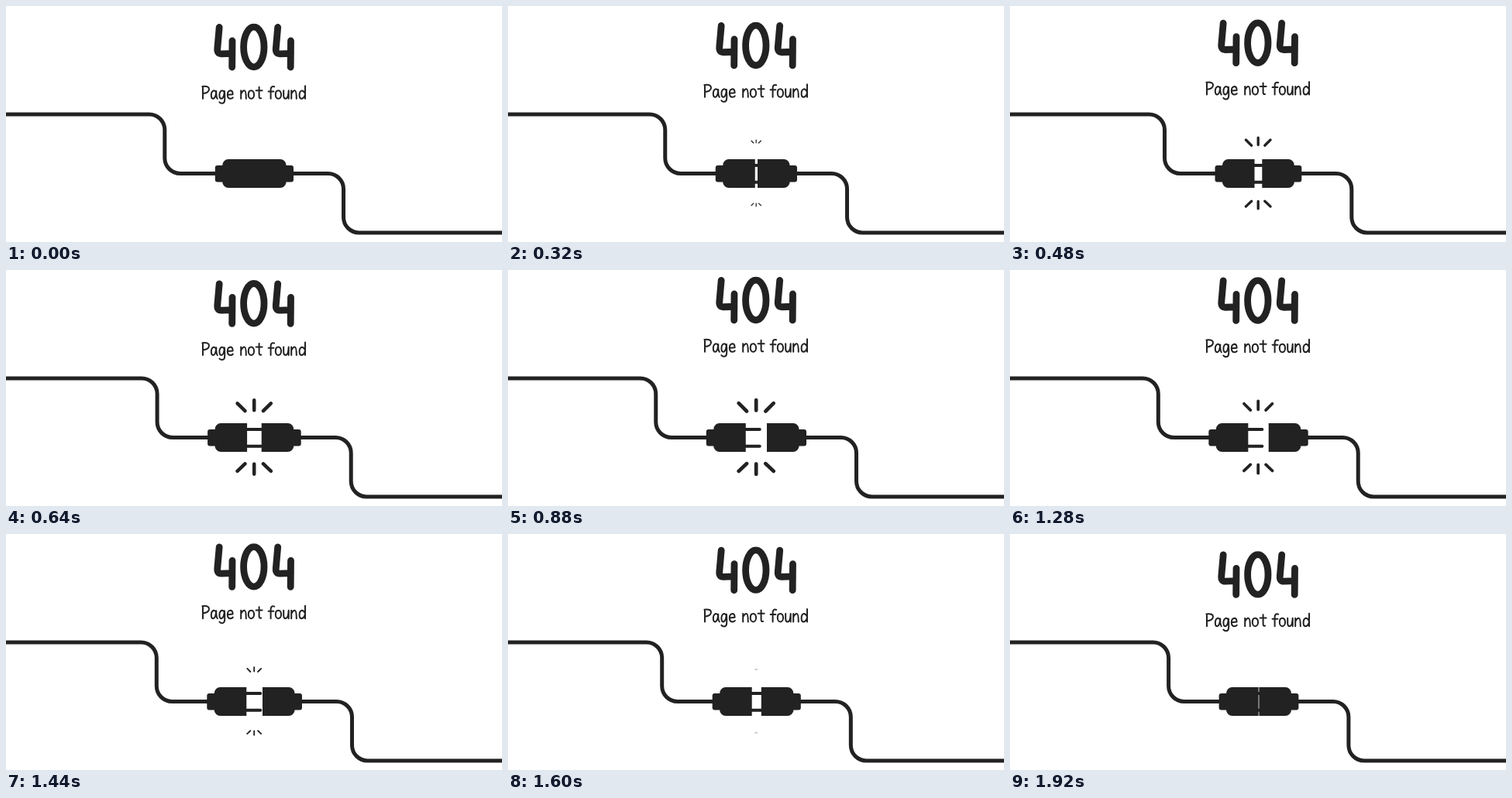
These frames come from a looping animation (640x305 px, 2 s). An HTML page:

```html
<!DOCTYPE html>
<html lang="en">
<head>
<meta charset="utf-8">
<title>404 Page not found</title>
<style>
  html, body { margin: 0; width: 100%; height: 100%; overflow: hidden; background: #fff; }
  svg { display: block; width: 100%; height: 100%; }
  .line { fill: none; stroke: #222; stroke-linecap: round; stroke-linejoin: round; }
  .cable { stroke-width: 5; stroke-linecap: butt; }
  .prong { stroke-width: 4; }
  .ray { stroke-width: 4.7; }
  .digit { stroke-width: 8.8; }
  .letter { stroke-width: 2; }
  .solid { fill: #222; }
  /* selectable text beneath the drawn handwriting */
  text { fill: transparent; font-family: "Open Sans", sans-serif; text-anchor: middle; }
</style>
</head>
<body>
<svg viewBox="0 0 640 305">
  <defs>
    <path id="four" class="line digit" d="M275.2 27.5 L272.8 55 Q272.2 62 278 61.8 L292 61.3 M292 45 L291.7 79"/>
    <path id="plug" class="solid" d="M320 198 V235 H286 Q283 235 281 233 L279.5 231 Q278.5 229.5 278.5 227.5 H272 Q269 227.5 269 224.5 V209 Q269 206 272 206 H278.5 Q278.5 203.5 279.5 202 L281 200 Q283 198 286 198 Z"/>
  </defs>

  <g id="title">
    <text x="320" y="80" font-size="76">404</text>
    <text x="320" y="120" font-size="20">Page not found</text>
    <use href="#four"/>
    <ellipse class="line digit" cx="319.8" cy="53" rx="13.2" ry="25.8"/>
    <use href="#four" x="75.5"/>
    <g id="caption"></g>
  </g>

  <g id="left">
    <path class="line cable" d="M-1 140 H184 a20 20 0 0 1 20 20 V196.5 a20 20 0 0 0 20 20 H272"/>
    <path class="line prong" d="M318 206 H338 M318 227.7 H338"/>
    <use href="#plug"/>
  </g>
  <g id="right">
    <path class="line cable" d="M368 216.5 H415.5 a20 20 0 0 1 20 20 V273 a20 20 0 0 0 20 20 H660"/>
    <use href="#plug" transform="matrix(-1 0 0 1 640 0)"/>
  </g>

  <g id="top"><path class="line ray" d="M0 -7 V6.5 M-22.5 -2.8 L-12.2 7.5 M22.5 -2.8 L12.2 7.5"/></g>
  <g id="bottom"><path class="line ray" d="M0 7 V-6.5 M-22.5 3 L-12.2 -6.8 M22.5 3 L12.2 -6.8"/></g>
</svg>
<script>
  const LOOP = 2000, STEP = 80, LAG = 60, TRAVEL = 15;
  const $ = id => document.getElementById(id);

  // Handwritten letters: strokes on a baseline at y = 0
  const bowl = "M6.5 -8 Q5 -10.8 3 -10.4 Q0 -9 0 -4.5 Q0 0 2.8 0 Q5.8 -.8 6.5 -9.8 ";
  const glyphs = {
    P: "M.6 0 V-15.8 M0 -15.8 Q8.8 -17 8.6 -12 Q8 -7.4 .8 -6.8",
    a: bowl + "Q6.2 -2 8 0",
    g: bowl + "Q7.2 0 6.6 3 Q6 6.2 3.2 6 Q1 6 0 4.4",
    e: "M.2 -5 L6.8 -5.6 Q6.8 -10.5 3.7 -10.5 Q0 -10 0 -5 Q0 0 4 0 Q6 0 7 -1.5",
    n: "M0 -10.5 V0 M0 -6 Q2 -10.5 4.4 -10.5 Q6.6 -10.5 6.6 0",
    o: "M3.6 -10.5 C8.6 -10.5 8.4 0 3.6 0 C-1.2 0 -1.2 -10.5 3.6 -10.5 Z",
    t: "M4 -15 V-3 Q4 .2 6.6 -.6 M0 -10.6 H8",
    f: "M7.6 -15.5 Q3.4 -17 3 -12 V0 M0 -9.4 H6.8",
    u: "M0 -10.5 V-4 Q0 0 2.8 0 Q6 -.4 6.5 -10.5 V0",
    d: "M7.4 -16.5 V0 M7.2 -7 Q5.4 -10.6 3 -10.4 Q0 -9.4 0 -4.5 Q0 0 3 0 Q6 -.5 7.2 -5"
  };
  const starts = [253.4, 264.8, 275.4, 285.8, 303.2, 312.8, 322.6, 338.6, 347.8, 358.2, 368.2, 378.6];
  $("caption").innerHTML = [..."Pagenotfound"].map((c, i) =>
    `<path class="line letter" transform="translate(${starts[i]} 119.8)" d="${glyphs[c]}"/>`).join("");

  const ease = p => {
    p = Math.min(1, Math.max(0, p));
    return p < .5 ? 2 * p * p : 1 - 2 * (1 - p) ** 2;
  };
  const pulse = (t, rise, fall, span) => ease((t - rise) / span) - ease((t - fall) / span);
  const move = (id, x, y, scale = 1) =>
    $(id).setAttribute("transform", `translate(${x} ${y}) scale(${scale})`);

  function draw(now) {
    const t = Math.floor(now % LOOP / STEP) * STEP;
    const phase = (t - LAG + LOOP) % LOOP;
    let pull = TRAVEL * pulse(phase, 0, 1000, 1000);
    if (pull < .2) pull = 0;
    const drift = Math.max(0, (t - 1120) / 800) * .8;
    const spark = pulse(phase, 20, 1020, 650);

    move("title", 0, -pull);
    move("left", .8 + drift / 2 - pull, 0);
    move("right", drift + pull, 0);
    for (const [id, y] of [["top", 175], ["bottom", 257]]) {
      move(id, 320.2, y, spark);
      $(id).style.display = spark > .01 ? "" : "none";
    }
  }

  function tick() {
    draw(performance.now());
    requestAnimationFrame(tick);
  }
  tick();
</script>
</body>
</html>
```
